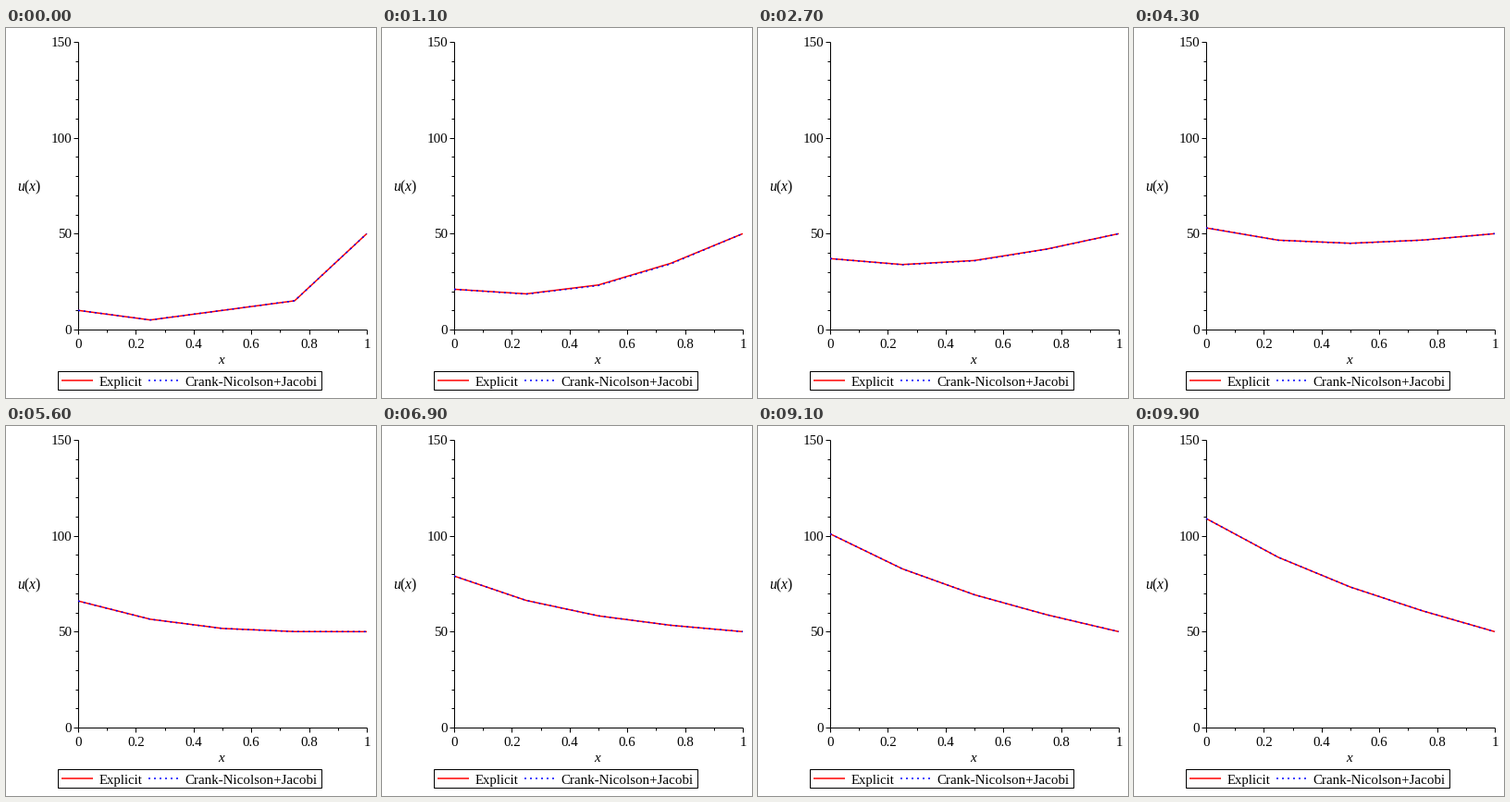
These frames come from a looping animation (400 by 400 pixels, 10000 ms). A matplotlib script:

```python
import numpy as np
import matplotlib.pyplot as plt
from matplotlib.animation import FuncAnimation
from matplotlib.patches import Rectangle

plt.rcParams.update({
    "font.family": "Liberation Serif",
    "mathtext.fontset": "custom",
    "mathtext.rm": "Liberation Serif",
    "mathtext.it": "Liberation Serif:italic",
})

DPI = 100
PX = 72 / DPI            # one pixel in points
FRAMES = 100
LEFT, RIGHT, TOP, BASE = 78, 390, 15, 326

# Heat equation u_t = u_xx with a rising left end and a fixed right end
DX, DT = 0.25, 0.01
R = DT / DX**2
START = np.array([10.0, 5, 10, 15, 50])


def left_end(n):
    return 10 + 100 * DT * n


def laplacian(u):
    return u[:-2] - 2 * u[1:-1] + u[2:]


def explicit_step(u, n):
    new = u.copy()
    new[1:-1] += R * laplacian(u)
    new[0] = left_end(n)
    return new


def crank_nicolson_step(u, n, sweeps=30):
    rhs = u[1:-1] + R / 2 * laplacian(u)
    new = u.copy()
    new[0] = left_end(n)
    for _ in range(sweeps):      # Jacobi iteration
        new[1:-1] = (rhs + R / 2 * (new[:-2] + new[2:])) / (1 + R)
    return new


def solve(step):
    rows = [START]
    for n in range(1, FRAMES):
        rows.append(step(rows[-1], n))
    return np.array(rows)


def to_x(x):
    return LEFT + (RIGHT - LEFT) * x


def to_y(u):
    return BASE - (BASE - TOP) * u / 150


fig = plt.figure(figsize=(4, 4), dpi=DPI, facecolor="white")
ax = fig.add_axes([0, 0, 1, 1])
ax.set(xlim=(0, 400), ylim=(400, 0))
ax.axis("off")


def line(xs, ys, color="black", width=1.0, **kw):
    return ax.plot(xs, ys, color=color, lw=width * PX,
                   solid_capstyle="butt", dash_capstyle="butt", **kw)[0]


def label(x, y, s, size=15, ha="center"):
    ax.text(x, y, s, fontsize=size * PX, ha=ha, va="baseline", color="black")


# Axes, ticks and labels
line([LEFT, LEFT], [TOP, BASE])
line([LEFT, RIGHT], [BASE, BASE])
for u in range(0, 151, 10):
    major = u % 50 == 0
    y = to_y(u)
    line([LEFT - (5 if major else 3), LEFT], [y, y])
    if major:
        label(71, y + 5, str(u), ha="right")
for k in range(11):
    major = k % 2 == 0
    x = to_x(k / 10)
    line([x, x], [BASE, BASE + (5 if major else 3)])
    if major:
        label(x, 346, f"{k / 10:g}")
label(233.5, 363, "$x$")
label(25, 176, "$u(x)$", 15.5)

# Legend
RED = dict(color="#ff0000", width=1.5)
BLUE = dict(color="#0000ff", width=1.5, ls=(0, (2 / 1.5, 4 / 1.5)))
ax.add_patch(Rectangle((56, 371), 285, 20, fill=False, ec="black", lw=PX))
line([60, 94], [381, 381], snap=False, **RED)
line([154, 187], [381, 381], snap=False, **BLUE)
label(100.5, 387, "Explicit", 14.8, "left")
label(193.5, 387, "Crank-Nicolson+Jacobi", 15, "left")

# Curves
nodes = to_x(np.linspace(0, 1, 5))
curves = [
    (line(nodes, to_y(START), **RED), solve(explicit_step)),
    (line(nodes, to_y(START), **BLUE), solve(crank_nicolson_step)),
]


def draw(n):
    for curve, rows in curves:
        curve.set_ydata(to_y(rows[n]))
    return [curve for curve, _ in curves]


anim = FuncAnimation(fig, draw, frames=FRAMES, interval=100,
                     repeat=True, repeat_delay=0, blit=False)
plt.show()
```
